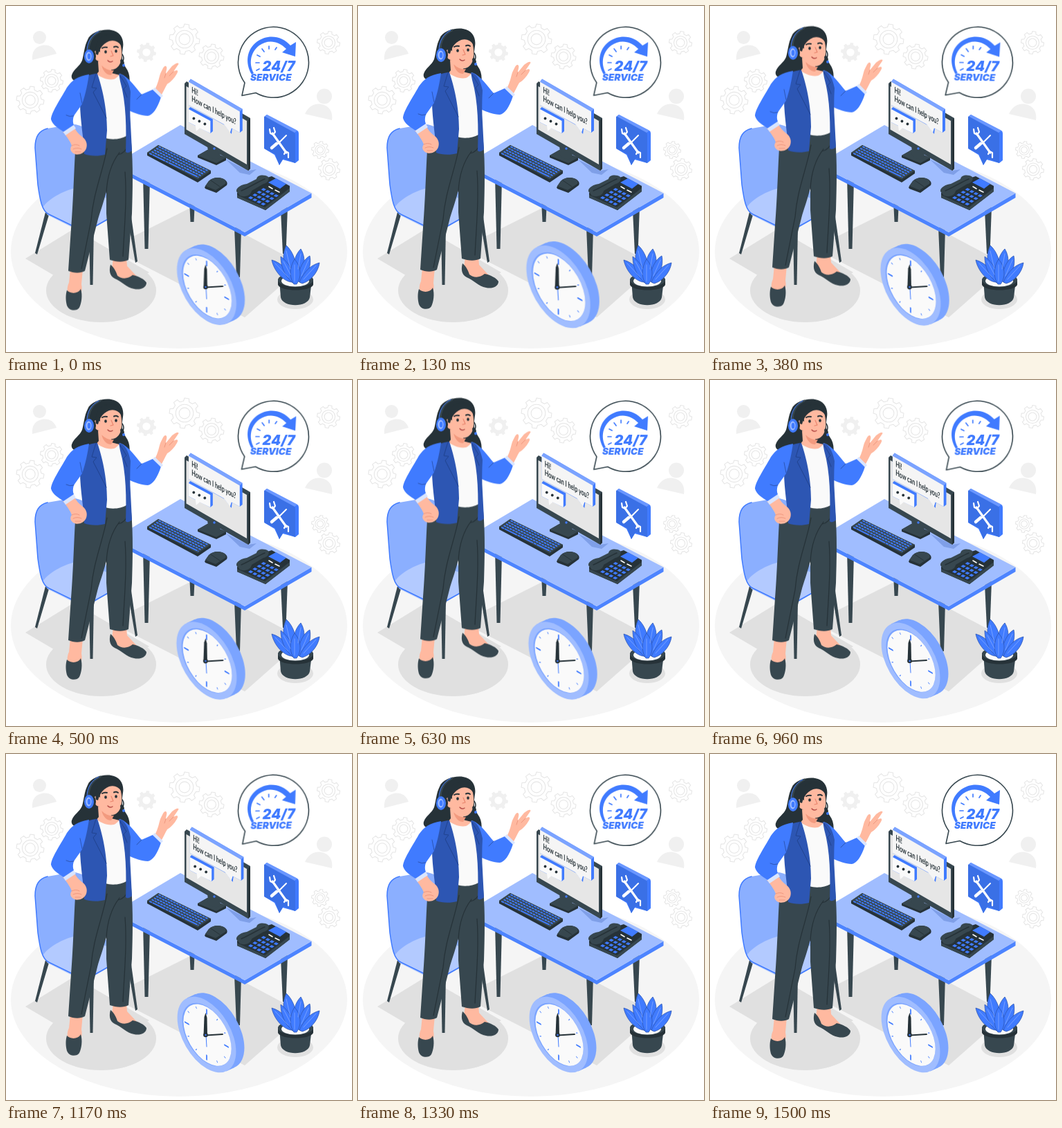
Recreate the animation shown at these times as an HTML page. Size 500 by 500 pixels, loop 1540 ms.

```html
<!DOCTYPE html>
<html lang="en">
<head>
<meta charset="utf-8">
<title>24/7 service</title>
<style>
html, body { margin: 0; width: 100%; height: 100%; overflow: hidden; background: #fff; }
svg { display: block; width: 100vw; height: 100vh; }
.b { fill: #407bff; } .l { fill: #a0bdff; } .n { fill: #2d56b3; }
.d { fill: #263238; } .p { fill: #37474f; } .s { fill: #ffb9a0; }
.w { fill: #fafafa; } .g { fill: #e0e0e0; } .bg { fill: #f0f0f0; }
.line { fill: none; stroke-linecap: round; stroke-linejoin: round; }
.float, .shake, .wind, .beat { animation: 1540ms linear -20ms infinite; }
.float { animation-name: float; }
.shake { animation-name: shake; }
.wind { animation-name: wind; transform-origin: 386px 81px; }
.beat { animation-name: beat; transform-origin: 295.5px 403px; }
/* A 1500 ms cycle followed by a 40 ms rest */
@keyframes float {
  0%, 97.4%, 100% { transform: translateY(0); }
  48.7% { transform: translateY(-10px); }
}
@keyframes shake {
  0%, 97.4%, 100% { transform: translateX(0); }
  9.74%, 87.66% { transform: translateX(-1px); }
  19.48%, 77.92% { transform: translateX(2px); }
  29.22%, 48.7%, 68.18% { transform: translateX(-4px); }
  38.96%, 58.44% { transform: translateX(4px); }
}
@keyframes wind {
  0%, 97.4%, 100% { transform: rotate(0); }
  24.35% { transform: rotate(1deg); }
  73.05% { transform: rotate(-1deg); }
}
@keyframes beat {
  0%, 63.3%, 100% { transform: scale(1); }
  9.74%, 58.44% { transform: scale(1.09); }
  14.6%, 48.7% { transform: scale(1.025); }
}
</style>
</head>
<body>
<svg viewBox="0 0 500 500">
  <!-- Floor and shadows -->
  <ellipse cx="250" cy="355" rx="243" ry="140" fill="#f5f5f5"/>
  <g class="g">
    <path d="M28 365L98 322 207 385 130 425Z"/>
    <path d="M150 350L270 290 430 375 345 450Z"/>
    <ellipse cx="137.500" cy="411" rx="79.500" ry="46"/>
    <ellipse cx="418" cy="424" rx="26" ry="14"/>
  </g>
  <g id="gears"></g>
  <g class="bg">
    <circle cx="48.500" cy="45.500" r="9.500"/>
    <path d="M38 78C37 66 42 59 52 57 62 55 70 60 73 69Z"/>
    <circle cx="460" cy="130.500" r="11"/>
    <path d="M432 156C437 145 446 140 456 142 467 144 473 153 471 165Z"/>
  </g>

  <!-- Chair -->
  <path class="p" d="M57 298L62 302 45 359 42 357Z"/>
  <path class="p" d="M173 290L179 290 190 369 187 371Z"/>
  <path fill="#8bafff" d="M42 205C42 188 48 180 60 177L95 171C122 170 136 200 140 250L150 290 118 325 62 301C52 297 49 280 46 258Z"/>
  <path fill="#b3caff" d="M53 291C64 276 86 266 104 262L162 284C166 292 162 300 154 305L122 324C114 328 106 324 98 321L60 302Z"/>
  <path class="line" stroke="#407bff" stroke-width="1.500" d="M60 177C48 180 42 188 42 205L46 258C49 280 52 297 62 301L103 321C112 325 118 325 124 321L158 302"/>
  <path class="p" d="M120 319L127 319 125.500 403 121.500 403Z"/>

  <!-- Desk -->
  <g class="p">
    <path d="M265 280H273L271.500 312H266.500Z"/>
    <path d="M198 246L208 250 205.500 351 200.500 351Z"/>
    <path d="M330 320H340L338 392H333Z"/>
    <path d="M397 295L407 290 404.500 358H400Z"/>
  </g>
  <path fill="#4d84ff" d="M156 229L345 327 441.500 270.500V277L345 333 156 235Z"/>
  <path class="l" d="M156 229L252 172 441.500 270.500 345 327Z"/>
  <path fill="#7f9fe8" d="M318 222L350 238 362 236 352 244 338 241Z"/>

  <!-- Monitor -->
  <path class="d" d="M277 216L291 208 318 219V223L304 230 277 219Z"/>
  <path class="p" d="M277 216L291 208 318 219 304 227Z"/>
  <path class="p" d="M291 198L310 208 309 219C305 223 297 221 292 216Z"/>
  <path class="p" d="M258 112L261 109 353 162V235L350 238 258 185Z"/>
  <path class="d" d="M350 165L353 163V235L350 238Z"/>
  <path fill="#e6e6e6" d="M260.500 116L348 166V229L260.500 178.500Z"/>
  <circle class="b" cx="301" cy="206" r="1.700"/>

  <!-- Message bubbles -->
  <g class="shake">
    <path class="b" d="M264 109.500L267 105.500 342 149V180L338 183 327 177 326 185 316 172 264 143Z"/>
    <path fill="#7ba3ff" d="M264 109.500L267 105.500 342 149 338 152.500Z"/>
    <path fill="#f5f5f5" d="M264 109.500L338 152.500V183L326 176.500 324 183 315 171 264 143Z"/>
    <g class="d" font-family="Lato, 'Open Sans', sans-serif" font-weight="700" font-size="12">
      <text transform="matrix(.6 .32 0 1 268.500 125)">Hi!</text>
      <text transform="matrix(.6 .32 0 1 268.500 137.500)">How can I help you?</text>
    </g>
    <path class="b" d="M264 149L266.500 146 299 163.500V181L295.500 184 264 168Z"/>
    <path class="w" d="M264 149L295.500 166V184L280 176.500 275 181 274 173 264 168Z"/>
    <g class="d">
      <circle cx="271.500" cy="162.500" r="1.900"/><circle cx="279.500" cy="166.500" r="1.900"/><circle cx="287.500" cy="170.500" r="1.900"/>
    </g>
  </g>

  <!-- Keyboard, mouse, phone -->
  <path class="d" d="M204 212L220 201 296 238V242L277 255 204 216Z"/>
  <path class="p" d="M204 212L220 201 296 238 277 250.500Z"/>
  <g id="keys" class="line" stroke="#407bff" stroke-width="1.900" style="stroke-linecap:butt"></g>
  <path class="d" d="M287 262L293 253C298 248 306 247 312 249 318 251 321 255 319 259L304 270 288 264Z"/>
  <path class="p" d="M288 260L293 253C298 248 306 247 312 249 317 251 319 254 317 257L303 266Z"/>
  <path class="line" stroke="#263238" d="M296 252L309 261"/>
  <path class="d" d="M334 270L352 256 384 246 410 260V268L375 295 334 277Z"/>
  <path class="p" d="M334 273L374 291 410 263V268L375 295 334 277Z"/>
  <path class="b" d="M379 255L390 249 405 257 396 264Z"/>
  <path class="line" stroke="#fff" stroke-width="1.600" d="M380 261L385 264M389 266L395 269"/>
  <g id="pad" class="b"></g>
  <path class="p" d="M333 268C332 262 341 258 348 257L362 250C363 244 373 243 379 247 381 251 378 256 372 257L355 267C354 274 345 277 338 274Z"/>
  <path class="line" stroke="#263238" stroke-width="1.500" d="M340 267C350 263 364 254 374 250"/>

  <!-- Tools sign -->
  <path class="b" d="M373 160L377 157 421 180Q423 181 423 184V223L418 227 400 222 395 230 388 215 373 206Z"/>
  <path fill="#3a70e6" d="M373 161Q373 159 376 160L416 182Q418 183 418 186V227L401 220 395 230 389 214 375 207Q373 206 373 204Z"/>
  <path fill="#6a97ff" d="M374 159.500L377 157 421 180 417 183Z"/>
  <g class="line" stroke="#fff">
    <path stroke-width="3.200" d="M385 184L405 212"/>
    <path stroke-width="2.200" d="M381 178L382 184 386 186 389 182 387 176M402 214L404 210 408 212 408 219"/>
    <path stroke-width="2" d="M405 187L393 199"/>
    <path stroke-width="4.500" d="M391 199L384 205"/>
  </g>

  <!-- Round-the-clock bubble -->
  <g class="wind">
    <path d="M345 111A51 51 0 1 1 361 125.500L341 129.500Z" fill="#fff" stroke="#37474f" stroke-width="1.600" stroke-linejoin="round"/>
    <path class="b" d="M355 99C345 82 348 63 362 52 378 40 399 43 411 57L419 52 418 73 399 67 405 62C394 50 378 48 366 57 354 66 350 82 358 97Z"/>
    <path class="line" stroke="#407bff" stroke-width="1.700" d="M361 82H366M363 71L367 73M370 62L373 66M380 58V62M391 60L389 63M362 93L366 91"/>
    <g class="b" font-family="Inter, Roboto, sans-serif" font-weight="900" font-style="italic">
      <text x="370.500" y="93.800" font-size="19.800" letter-spacing=".3">24/7</text>
      <text x="353" y="108" font-size="13.600">SERVICE</text>
    </g>
  </g>

  <!-- Plant -->
  <path class="p" d="M395 396H442L439 421C436 436 400 436 397 421Z"/>
  <path class="d" d="M393 396C393 384 444 384 444 396V403C440 413 397 413 393 403Z"/>
  <ellipse class="p" cx="418.500" cy="396" rx="25.500" ry="10"/>
  <ellipse class="w" cx="418" cy="397.500" rx="20" ry="8"/>
  <g stroke="#2d56b3" stroke-width=".8" class="b" stroke-linejoin="round">
    <path d="M412 392C400 380 398 360 405 346 416 356 422 374 418 394Z"/>
    <path d="M417 394C413 375 417 360 426 351 434 364 432 382 423 396Z"/>
    <path d="M421 397C423 379 430 366 439 361 442 374 436 391 426 400Z"/>
    <path d="M424 399C431 383 441 374 453 371 451 386 439 398 428 401Z"/>
    <path d="M415 399C404 400 388 386 384 367 398 371 410 383 416 398Z"/>
    <path d="M414 400C402 389 397 376 397 362 408 370 417 385 419 400Z"/>
    <path d="M416 402C408 390 411 375 417 366 426 376 428 391 420 402Z"/>
  </g>
  <path class="line" stroke="#8fb1ff" stroke-width=".7" d="M417 374V398M405 354L411 380M426 358L422 380M437 367L427 390M448 375L430 395M389 372L408 392M401 369L411 388"/>

  <!-- Clock -->
  <g class="beat">
    <circle r="49" transform="matrix(.866 .5 0 1 302 400)" fill="#7ba4ff"/>
    <path d="M261.700 352.600L273.700 347.100 330.300 452.900 318.300 458.400Z" fill="#7ba4ff"/>
    <g transform="matrix(.866 .5 0 1 290 405.500)">
      <circle r="49" class="l"/>
      <circle r="41" fill="#7ba4ff"/>
      <circle cx="1.200" r="40" class="w"/>
      <g id="ticks" class="line" stroke="#407bff"></g>
    </g>
    <path class="d" d="M285.500 407L286.500 380 288.500 374 290.500 381 291 407Z"/>
    <path class="line" stroke="#263238" stroke-width="1.800" d="M289 406.500L313 405"/>
    <path class="line" stroke="#407bff" d="M289 406L290 423"/>
    <circle class="d" cx="288.500" cy="406" r="3.300"/>
    <circle class="b" cx="288.500" cy="406" r="1.200"/>
  </g>

  <!-- Agent -->
  <g class="float">
    <path class="s" d="M93 380H111L109 402C112 416 104 424 96 422 88 420 87 408 91 400Z"/>
    <path class="p" d="M88 411C92 416 104 417 108 409 111 418 109 430 106 436 102 442 91 441 88 433 86 426 86 417 88 411Z"/>
    <path class="s" d="M155 364H174L175 376 189 391C184 398 170 397 159 389L153 380Z"/>
    <path class="p" d="M151 374C155 377 159 383 161 390 167 395 176 395 183 389 192 391 200 395 203 400 203 408 193 411 185 409 174 407 167 398 157 394 149 390 149 381 151 374Z"/>

    <path class="p" d="M100 210L145 189 175 186 181 198C184 230 183 268 182 300L177 367C169 371 159 370 150 367L145 300 145 268C141 285 135 300 132 312L114 383C107 387 97 386 90 383L94 322C97 285 98 245 100 210Z"/>
    <path class="line" stroke="#263238" stroke-width="1.200" d="M145 270C146 250 150 230 164 212M176 202C173 210 168 214 162 215M146 206C140 240 126 270 123 310L109 380M172 240C175 280 171 320 169 362"/>

    <!-- Head -->
    <path class="d" d="M118 49C122 38 140 33 152 35 165 37 171 48 169 60 167 72 167 80 173 89 179 97 180 107 177 119L150 114 112 108C101 112 93 107 95 100 98 91 107 87 110 79 113 68 113 59 118 49Z"/>
    <path class="s" d="M133 80L152 86 152 97 164 100 152 122 130 100 134 95Z"/>
    <path class="w" d="M130 98C136 103 147 108 156 106 161 104 163 100 165 98L174 130V188C166 193 152 194 144 191Z"/>
    <path fill="#f29a7f" d="M138 86C144 92 150 94 156 93L152 100C146 100 141 96 138 86Z"/>
    <path class="s" d="M127 67C130 63 134 65 136 67 135 58 140 52 148 49 156 47 163 49 165 54 168 65 168 75 165 83 162 90 155 94 148 92 141 89 136 85 134 80 129 79 125 72 127 67Z"/>
    <path class="d" d="M133 71C135 63 139 55 149 51 156 49 162 51 166 57 167 46 158 40 146 42 134 44 128 56 130 70Z"/>
    <g class="d">
      <ellipse cx="144" cy="66.500" rx="1.800" ry="2.200"/><ellipse cx="159" cy="65.500" rx="1.800" ry="2.200"/>
    </g>
    <g class="line" stroke="#263238" stroke-width="2">
      <path d="M139 61Q142 59 146 60M156 59.500Q159 58 162 60"/>
      <path stroke="#e8836b" stroke-width="1.100" d="M152 65L155 72 151 73"/>
      <path stroke="#b34a45" stroke-width="1.400" d="M147 79Q150 82.500 154 80"/>
    </g>

    <!-- Headset -->
    <path class="line" stroke="#37474f" stroke-width="3" d="M119 66C119 52 125 42 136 37"/>
    <path class="line" stroke="#407bff" stroke-width="1" d="M117 66C117 52 124 42 134 37"/>
    <ellipse class="d" cx="122" cy="73" rx="8" ry="10.500"/>
    <ellipse class="b" cx="120" cy="73" rx="7" ry="10"/>
    <ellipse class="l" cx="119.500" cy="73" rx="4" ry="6.500"/>
    <ellipse class="b" cx="120" cy="73" rx="2.400" ry="4.200"/>
    <path class="line" stroke="#263238" stroke-width="1.500" d="M168 70Q172 76 168 82"/>
    <ellipse class="d" cx="168" cy="81" rx="2.400" ry="4" transform="rotate(-25 168 81)"/>
    <circle class="b" cx="170" cy="86" r="2"/>

    <!-- Jacket and arms -->
    <path class="s" d="M215 121C220 112 221 104 223 98 226 92 228 86 231 87 234 89 231 94 231 98L240 87C244 84 249 81 249.500 84L242 95C247 92 250 93 247 98 243 105 238 110 233 113 230 118 228 123 224 130Z"/>
    <path class="line" stroke="#ec947b" stroke-width=".9" d="M231 98L229 104M242 95L236 101"/>
    <path class="b" d="M165 98C178 103 187 118 196 128L212 121 224 132C219 148 212 158 205 159 196 159 186 155 177 151Z"/>
    <path fill="#d9e5ff" d="M212 121L215 118 227 130 224 133Z"/>
    <path class="line" stroke="#2d56b3" d="M196 128L189 135"/>
    <path class="n" d="M163 98C172 100 177 109 180 124 179 140 179 156 180 170L182 209C178 213 175 213 173 211 174 180 174 140 165 109Z"/>
    <path class="n" d="M111 106C117 100 126 98 132 98 139 118 146 148 146 180L143 215C132 218 121 217 113 214 113 195 107 166 107 140Z"/>
    <path class="line" stroke="#21438f" stroke-width="1" d="M130 98L124 118 131 119 126 125 145 162M165 101L174 116 170 120 175 132"/>
    <path class="s" d="M82 182L98 173C100 181 106 186 111 190 116 194 118 200 116 206 113 214 103 217 97 213 93 210 92 206 95 202 93 196 88 189 82 182Z"/>
    <path class="line" stroke="#ec947b" stroke-width=".9" d="M95 202Q101 199 106 202M97 207Q103 204 109 207M100 211L108 211"/>
    <path fill="#d9e5ff" d="M82 181L97 171 101 177 86 187Z"/>
    <path class="b" d="M120 99C103 102 96 107 88 118 78 136 65 155 65 164 67 172 76 177 83 182L98 172C96 167 97 163 98 159L110 142C115 128 118 112 120 99Z"/>
    <path class="line" stroke="#2d56b3" d="M98 159Q92 161 87 158M110 141L107 126"/>
  </g>
</svg>
<script>
const $ = id => document.getElementById(id);
const path = (d, attrs = '') => `<path d="${d}" ${attrs}/>`;

// x, y, radius, solid
const gears = [[258, 48, 22], [297, 73, 18], [203, 67, 14, 1], [66, 108, 16.5], [35, 136, 20], [466, 53, 16.5], [454, 208, 12.5], [467, 236, 15.5]];

function gear([x, y, r, solid]) {
  const n = 8, pts = [];
  for (let i = 0; i < n; i++) {
    for (const [k, o] of [[.8, -.3], [1, -.19], [1, .19], [.8, .3]]) {
      const a = (i + o) / n * 2 * Math.PI + .15;
      pts.push((k * r * Math.cos(a)).toFixed(2) + ' ' + (k * r * Math.sin(a)).toFixed(2));
    }
  }
  const style = solid ? 'fill="#f0f0f0"' : 'fill="none" stroke="#e6e6e6" stroke-width="1.1"';
  const holes = solid ? `<circle r="${r * .4}" fill="#fff"/>`
    : `<circle r="${r * .58}" ${style}/><circle r="${r * .36}" ${style}/>`;
  return `<g transform="translate(${x} ${y})">${path('M' + pts.join('L') + 'Z', style + ' stroke-linejoin="round"')}${holes}</g>`;
}
$('gears').innerHTML = gears.map(gear).join('');

let keys = '';
for (let i = 0; i < 5; i++) {
  const x = 220.5 - i * 3.3, y = 203.2 + i * 2.4;
  keys += path(`M${x} ${y}l71 34.8`, `stroke-dasharray="${i == 4 ? '4 1 20 1' : '3.6 1.1'}"`);
}
$('keys').innerHTML = keys;

let pad = '';
for (let r = 0; r < 4; r++)
  for (let c = 0; c < 4; c++)
    pad += path(`M${372 + c * 6 - r * 6.2} ${263 + c * 3 + r * 4}l4 2-3.4 2.3-4-2z`);
$('pad').innerHTML = pad;

let ticks = '';
for (let i = 0; i < 12; i++)
  ticks += path(`M0 ${i % 3 ? -34 : -30}V-36`, `transform="rotate(${i * 30})" stroke-width="${i % 3 ? 1.1 : 2}"`);
$('ticks').innerHTML = ticks;
</script>
</body>
</html>
```
